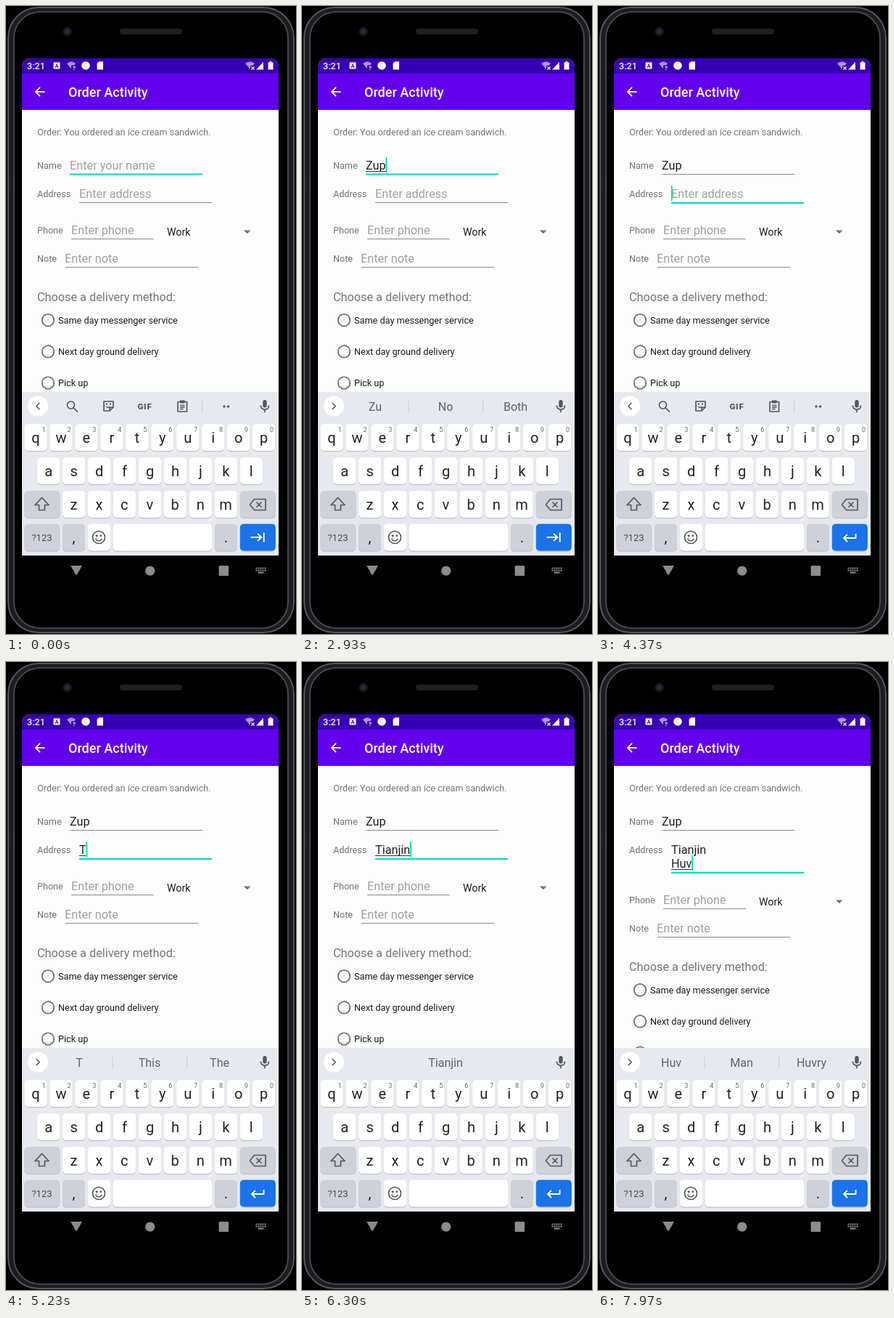
An HTML page for the animation above (8 s loop, 400 px wide and 864 px high).

```html
<!DOCTYPE html>
<html lang="en">
<head>
<meta charset="utf-8">
<title>Order form</title>
<style>
html, body { margin: 0; width: 100%; height: 100%; overflow: hidden; background: #000; }
svg { display: block; width: 400px; height: 864px; font-family: Roboto, "Noto Sans", sans-serif; }
.label { font-size: 12.62px; fill: #757575; }
.field { font-size: 16.25px; fill: #212121; }
.hint { fill: #a0a0a0; }
.head { fill: #757575; }
.choice { font-size: 12.7px; fill: #1c1c1c; }
.key { font-size: 20px; fill: #202124; text-anchor: middle; }
.sup { font-size: 9px; fill: #5f6368; text-anchor: middle; }
.word { font-size: 16px; fill: #5f6368; text-anchor: middle; }
.rule { stroke: #8a8a8a; stroke-width: 1; }
.rule.on { stroke: #03dac5; stroke-width: 2; }
.icon { fill: none; stroke: #55585e; stroke-width: 1.7; stroke-linejoin: round; }
.ring { fill: none; stroke: #707070; stroke-width: 1.8; }
.solid { fill: #55585e; stroke: none; }
</style>
</head>
<body>
<svg viewBox="0 0 400 864">
  <defs>
    <clipPath id="screen"><path d="M22 756V84a12 12 0 0 1 12-12H364a12 12 0 0 1 12 12V756Z"/></clipPath>
    <clipPath id="page"><rect x="22" y="143" width="354" height="388"/></clipPath>
  </defs>

  <!-- Phone body -->
  <rect width="400" height="864"/>
  <rect x="3" y="2" width="394" height="860" rx="42" fill="#1c1c20" stroke="#56565c" stroke-width="2"/>
  <rect x="11" y="8" width="378" height="848" rx="36" fill="#000" stroke="#46464c" stroke-width="2"/>
  <circle cx="84.500" cy="35" r="6" fill="#1c1c26"/>
  <circle cx="84.500" cy="35" r="3" fill="#2c2c40"/>
  <rect x="157" y="31" width="86" height="8" rx="4" fill="#1f1f24"/>

  <g clip-path="url(#screen)">
    <rect x="22" y="72" width="354" height="684" fill="#fdfdfd"/>
    <rect x="22" y="72" width="354" height="21" fill="#3700b3"/>
    <rect x="22" y="93" width="354" height="50" fill="#6200ee"/>

    <!-- Status bar -->
    <g fill="#f8f8fa">
      <text x="29" y="86.500" font-size="12.600" font-weight="500">3:21</text>
      <rect x="65.500" y="77.500" width="9" height="9" rx="1"/>
      <path d="M84 79Q90 74 96 79L94 81.500H90V86.500Z" opacity=".6"/>
      <text x="92" y="88" font-size="8" font-weight="700">?</text>
      <circle cx="110" cy="82" r="5.800"/>
      <path d="M128 76.500H134V87.500H125.500V79Z"/>
      <path d="M330 79Q336.500 74 343 79L340.500 82L337 82V87Z" opacity=".6"/>
      <path d="M338.500 83.500L342.500 87.500M342.500 83.500L338.500 87.500" stroke="#f8f8fa" stroke-width="1.200"/>
      <path d="M355 77V87.500H345Z"/>
      <path d="M361.500 77.500H363.500V76.300H366.500V77.500H368.500V87.500H361.500Z"/>
    </g>
    <text x="70" y="85" font-size="7.500" font-weight="700" text-anchor="middle" fill="#3700b3">A</text>

    <!-- App bar -->
    <path d="M53.500 118H41M47 111.800L40.800 118L47 124.200" fill="none" stroke="#fff" stroke-width="1.800"/>
    <text x="86" y="125" font-size="18.030" font-weight="500" fill="#fff">Order Activity</text>

    <!-- Form -->
    <g clip-path="url(#page)">
      <text class="label" x="43" y="178">Order: You ordered an ice cream sandwich.</text>
      <text class="label" x="43" y="224">Name</text>
      <text class="field" id="name" x="88" y="225"></text>
      <path class="rule" id="nameRule" d="M88 231.500H271"/>
      <text class="label" x="43" y="263">Address</text>
      <text class="field" id="addr" x="101" y="264"></text>
      <text class="field" id="addr2" x="101" y="283"></text>
      <path class="rule" id="addrRule" d="M101 270.500H284"/>
      <path id="compose" stroke="#333" stroke-width="1"/>
      <rect id="caret" width="1.800" height="21" fill="#03dac5"/>
      <g id="lower">
        <text class="label" x="43" y="313">Phone</text>
        <text class="field hint" x="90" y="314">Enter phone</text>
        <path class="rule" d="M90 320.500H204"/>
        <text x="222" y="316" font-size="14.200" fill="#1c1c1c">Work</text>
        <path d="M328 308.500H337.500L332.750 313.300Z" fill="#757575"/>
        <text class="label" x="43" y="352">Note</text>
        <text class="field hint" x="81" y="353">Enter note</text>
        <path class="rule" d="M82 359.500H265"/>
        <text class="field head" x="43" y="406">Choose a delivery method:</text>
        <g id="choices"></g>
      </g>
    </g>

    <!-- Keyboard -->
    <rect x="22" y="531" width="354" height="225" fill="#e7e9ee"/>
    <circle cx="44" cy="550.500" r="14" fill="#fff"/>
    <path class="icon" id="chevron" d="M46.300 546L41.800 550.500L46.300 555"/>
    <g id="tools">
      <path class="icon" d="M93.300 553L99 558.700"/>
      <circle class="icon" cx="89.500" cy="549" r="5"/>
      <path class="icon" d="M135 544H148V552L143 557H135ZM148 552H143V557M138.500 551Q141 554 144 551"/>
      <path class="solid" d="M138 546.500h2v2h-2zM143 546.500h2v2h-2z"/>
      <text x="191.500" y="554.500" font-size="11.500" font-weight="900" letter-spacing=".8" text-anchor="middle" class="solid">GIF</text>
      <path class="icon" d="M237 544.500H249.500V558H237ZM240 549.500H246.500M240 552H246.500M240 554.500H244.500"/>
      <rect class="solid" x="240" y="542.500" width="6.500" height="4"/>
      <path d="M270.500 541V560" stroke="#cdd0d5"/>
      <path d="M301 551h11" stroke="#55585e" stroke-width="3.600" stroke-linecap="round" stroke-dasharray="0 5.500"/>
    </g>
    <g id="strip">
      <path id="bars" d="M147 541V560M249.500 541V560" stroke="#cdd0d5"/>
      <text class="word" x="101" y="557"></text>
      <text class="word" x="198" y="557"></text>
      <text class="word" x="294.500" y="557"></text>
    </g>
    <rect class="solid" x="354.300" y="542" width="5.400" height="10.500" rx="2.700"/>
    <path class="icon" d="M351.500 549.500Q351.500 555 357 555Q362.500 555 362.500 549.500M357 555V559"/>
    <g id="keys"></g>
    <path class="icon" d="M49.500 676.500L40 686.500H45.500V693.500H53.500V686.500H59Z"/>
    <path class="icon" d="M342.500 678.500H358V693.500H342.500L336.500 686ZM345.500 682.500L352.500 689.500M352.500 682.500L345.500 689.500"/>
    <text x="49.500" y="736" font-size="13" text-anchor="middle" fill="#4a4d52">?123</text>
    <text class="key" x="93.500" y="738">,</text>
    <text class="key" x="303.500" y="738">.</text>
    <circle class="icon" cx="128" cy="731" r="8.500"/>
    <path class="icon" d="M123.500 733Q128 739 132.500 733"/>
    <path class="solid" d="M124 727.500h2.500v2.500h-2.500zM129.500 727.500h2.500v2.500h-2.500z"/>
    <path id="action" fill="none" stroke="#fff" stroke-width="1.900"/>
  </g>

  <!-- Navigation bar -->
  <g fill="#8c8c8c">
    <path d="M89 770H105L97 783.500Z"/>
    <circle cx="198.700" cy="777" r="6.600"/>
    <rect x="293.500" y="770" width="13.500" height="14" rx="1"/>
    <path d="M344.500 773.500H358.500M344.500 776.500H358.500" stroke="#8c8c8c" stroke-width="2" stroke-dasharray="2 1"/>
    <path d="M347.500 778.500H355.500V780.500H347.500Z"/>
  </g>
</svg>
<script>
const LOOP = 8000, FADE = 110, LINE = 19;
const $ = id => document.getElementById(id);
const show = (el, on) => el.setAttribute('visibility', on ? 'visible' : 'hidden');

// Radio buttons
$('choices').innerHTML = ['Same day messenger service', 'Next day ground delivery', 'Pick up']
  .map((text, i) => {
    const y = 432.2 + i * 43.2;
    return `<circle class="ring" cx="58" cy="${y}" r="8.300"/><text class="choice" x="72" y="${y + 4.8}">${text}</text>`;
  }).join('');

// Keys
const PLAIN = '#fff', GREY = '#ced1d7';
const keyBox = (x, y, w, fill) =>
  `<rect x="${x}" y="${y + 1.2}" width="${w}" height="37" rx="5" fill="#bfc2c8"/>` +
  `<rect x="${x}" y="${y}" width="${w}" height="37" rx="5" fill="${fill}"/>`;
const keyRow = (letters, left, y) => [...letters].map((c, i) => {
  const x = left + i * 34.95;
  return keyBox(x - 15.6, y, 31.2, PLAIN) + `<text class="key" x="${x}" y="${y + 25.5}">${c}</text>`;
}).join('');
$('keys').innerHTML =
  keyRow('qwertyuiop', 41, 575) + keyRow('asdfghjkl', 58.7, 621) + keyRow('zxcvbnm', 93.4, 667) +
  [...'1234567890'].map((d, i) => `<text class="sup" x="${52 + i * 34.95}" y="585.500">${d}</text>`).join('') +
  keyBox(25.4, 667, 49, GREY) + keyBox(322.8, 667, 49, GREY) +
  keyBox(25.4, 712.5, 49, GREY) + keyBox(77.8, 712.5, 31.2, GREY) +
  keyBox(112.7, 712.5, 31.2, PLAIN) + keyBox(147.5, 712.5, 136.5, PLAIN) +
  keyBox(287.8, 712.5, 31.2, GREY) + keyBox(322.8, 712.5, 49, '#1a73e8');

const NEXT = 'M337.500 731H352M347 726L352.300 731L347 736M355.700 724.500V737.500';
const ENTER = 'M355.500 726V732H339.500M344 727L339 732L344 737';

// Each step changes part of the state from its time on
const steps = [
  [0, { focus: 0, name: '', addr: '', addr2: null, words: null, typing: false }],
  [2230, { name: 'Z', typing: true }],
  [2300, { words: ['Z', 'Zoo', 'Zone'] }],
  [2530, { name: 'Zu' }],
  [2620, { words: ['Zu', 'No', 'Both'] }],
  [2870, { name: 'Zup' }],
  [3070, { words: ['Zup', 'Up', 'Cup'] }],
  [3370, { focus: 1, typing: false, words: null }],
  [5070, { addr: 'T', typing: true }],
  [5100, { words: ['T', 'This', 'The'] }],
  [5470, { addr: 'Ti' }],
  [5560, { words: ['Ti', 'To', 'Time'] }],
  [5700, { addr: 'Tia' }],
  [5830, { addr: 'Tian', words: ['Tian', 'Giant', 'Tiara'] }],
  [5970, { addr: 'Tianj' }],
  [6070, { addr: 'Tianji', words: ['', 'Tianjin', ''] }],
  [6200, { addr: 'Tianjin' }],
  [6870, { addr2: '', typing: false, words: null }],
  [7600, { addr2: 'H', typing: true, words: ['Hug', 'Hut', 'Huvry'] }],
  [7700, { addr2: 'Hu' }],
  [7930, { addr2: 'Huv', words: ['Huv', 'Man', 'Huvry'] }],
];
const blinks = [67, 570, 1070, 1570, 2000, 3870, 4370, 4870, 5070, 6700, 6870, 7400, 7600];
const wordEls = [...document.querySelectorAll('.word')];

function stateAt(t) {
  const s = { since: -LOOP };
  for (const [at, change] of steps) {
    if (at > t) break;
    if (at && 'words' in change && !change.words !== !s.words) s.since = at;
    Object.assign(s, change);
  }
  return s;
}

function fill(el, text, hint) {
  const value = text || hint;
  if (el.textContent !== value) el.textContent = value;
  el.classList.toggle('hint', !text);
}

function draw(now) {
  const t = now % LOOP, s = stateAt(t);
  const second = s.addr2 !== null, shift = second ? LINE : 0;
  fill($('name'), s.name, 'Enter your name');
  fill($('addr'), s.addr, 'Enter address');
  fill($('addr2'), s.addr2, '');
  $('lower').setAttribute('transform', `translate(0 ${shift})`);
  $('addrRule').setAttribute('transform', `translate(0 ${shift + s.focus / 2})`);
  $('nameRule').classList.toggle('on', s.focus === 0);
  $('addrRule').classList.toggle('on', s.focus === 1);

  const id = s.focus === 0 ? 'name' : second ? 'addr2' : 'addr';
  const x = +$(id).getAttribute('x'), y = +$(id).getAttribute('y');
  const width = s[id] ? $(id).getComputedTextLength() : 0;
  $('caret').setAttribute('x', x + width - .2);
  $('caret').setAttribute('y', y - 17);
  show($('caret'), blinks.filter(b => b <= t).length % 2);
  $('compose').setAttribute('d', `M${x} ${y + 2.5}h${width}`);
  show($('compose'), s.typing);

  const p = Math.min(1, (t - s.since) / FADE), open = s.words ? p : 1 - p;
  $('strip').setAttribute('opacity', s.words ? open : 0);
  $('tools').setAttribute('opacity', 1 - open);
  $('chevron').setAttribute('transform', `rotate(${180 * open} 44 550.5)`);
  wordEls.forEach((el, i) => { el.textContent = s.words ? s.words[i] : ''; });
  $('bars').setAttribute('opacity', s.words && s.words[0] ? 1 : 0);
  $('action').setAttribute('d', s.focus ? ENTER : NEXT);
}

const start = performance.now();
function tick() {
  draw(performance.now() - start);
  requestAnimationFrame(tick);
}
tick();
</script>
</body>
</html>
```
